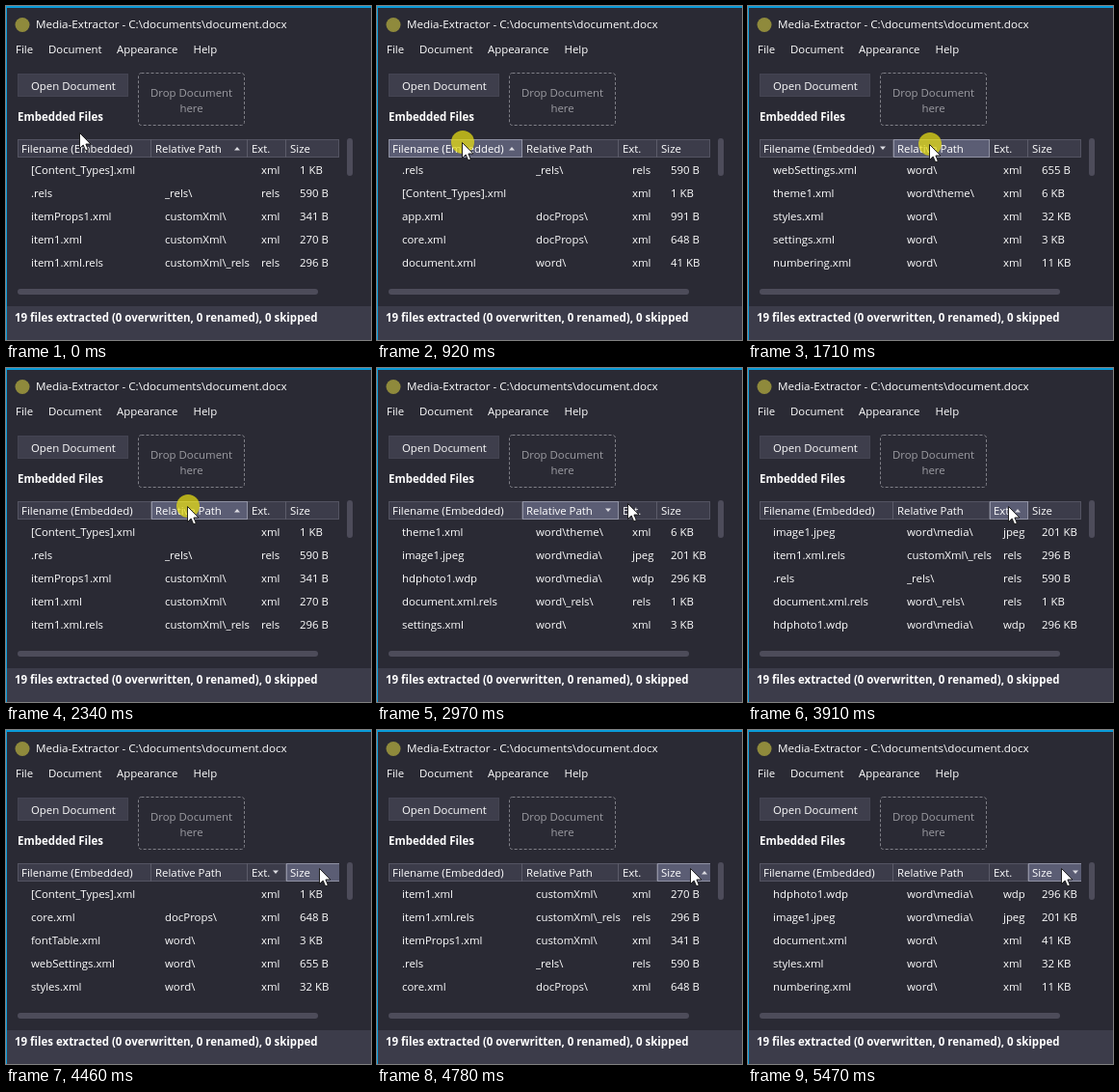
These frames come from a looping animation (379x346 px, 7.1 s). An HTML page with a canvas:

```html
<!DOCTYPE html>
<html lang="en">
<head>
<meta charset="utf-8">
<title>Media-Extractor</title>
<style>
  html, body { margin: 0; width: 100%; height: 100%; overflow: hidden; background: #2a2a34; }
  canvas { display: block; width: 379px; height: 346px; }
</style>
</head>
<body>
<canvas id="stage" width="379" height="346"></canvas>
<script>
const ctx = document.getElementById('stage').getContext('2d');
const LOOP = 7100;
const STEP = 78.2;        // the pointer is redrawn once per step
const SORT_DELAY = 160;   // from mouse press to the re-sorted list
const FONT = '"Open Sans", "Noto Sans", sans-serif';
const BACK = '#2a2a34', PANEL = '#3c3c4a', ACCENT = '#0a9bd8';

const columns = [
  { title: 'Filename (Embedded)', left: 12, right: 151 },
  { title: 'Relative Path', left: 151, right: 251 },
  { title: 'Ext.', left: 251, right: 291 },
  { title: 'Size', left: 291, right: 351 }
];
const table = { left: 12, right: 346, top: 138, height: 19 };

// name: [relative path, size]
const files = {
  '[Content_Types].xml': ['', '1 KB'],
  '.rels': ['_rels\\', '590 B'],
  'itemProps1.xml': ['customXml\\', '341 B'],
  'item1.xml': ['customXml\\', '270 B'],
  'item1.xml.rels': ['customXml\\_rels\\', '296 B'],
  'app.xml': ['docProps\\', '991 B'],
  'core.xml': ['docProps\\', '648 B'],
  'document.xml': ['word\\', '41 KB'],
  'webSettings.xml': ['word\\', '655 B'],
  'theme1.xml': ['word\\theme\\', '6 KB'],
  'styles.xml': ['word\\', '32 KB'],
  'settings.xml': ['word\\', '3 KB'],
  'numbering.xml': ['word\\', '11 KB'],
  'fontTable.xml': ['word\\', '3 KB'],
  'image1.jpeg': ['word\\media\\', '201 KB'],
  'hdphoto1.wdp': ['word\\media\\', '296 KB'],
  'document.xml.rels': ['word\\_rels\\', '1 KB']
};

const byPath = '[Content_Types].xml .rels itemProps1.xml item1.xml item1.xml.rels';
const initial = { column: 1, ascending: true, rows: byPath };

// Each column is clicked twice: ascending, then descending
const clicks = [
  { at: 460, hold: 80, rows: '.rels [Content_Types].xml app.xml core.xml document.xml' },
  { at: 920, hold: 160, rows: 'webSettings.xml theme1.xml styles.xml settings.xml numbering.xml' },
  { at: 1710, hold: 160, rows: byPath },
  { at: 2340, hold: 160, rows: 'theme1.xml image1.jpeg hdphoto1.wdp document.xml.rels settings.xml' },
  { at: 3510, hold: 80, rows: 'image1.jpeg item1.xml.rels .rels document.xml.rels hdphoto1.wdp' },
  { at: 3830, hold: 80, rows: '[Content_Types].xml core.xml fontTable.xml webSettings.xml styles.xml' },
  { at: 4620, hold: 80, rows: 'item1.xml item1.xml.rels itemProps1.xml .rels core.xml' },
  { at: 5310, hold: 80, rows: 'hdphoto1.wdp image1.jpeg document.xml styles.xml numbering.xml' }
].map((click, i) => ({ ...click, column: i >> 1, ascending: i % 2 === 0 }));

const moves = [
  { from: 0, to: 240, x: 89, y: 141 },
  { from: 1000, to: 1540, x: 189, y: 143 },
  { from: 2650, to: 3037, x: 271, y: 143 },
  { from: 3990, to: 4220, x: 326, y: 143 }
];

// The pointer eases from header to header along a slight arc
function pointerAt(t) {
  let x = 77, y = 131;
  for (const m of moves) {
    const p = Math.min(1, Math.max(0, (t - m.from) / (m.to - m.from)));
    const e = p * p * (3 - 2 * p);
    x += (m.x - x) * e;
    y += (m.y - y) * e - 4 * Math.sin(Math.PI * p);
  }
  return [Math.round(x), Math.round(y)];
}

// Header highlighting trails the pointer by one step
function hoveredColumn(t) {
  const [x, y] = pointerAt(t - STEP);
  return y < table.top ? -1 : columns.findIndex(c => x >= c.left && x < c.right);
}

function text(str, x, y, { size = 11.4, weight = 400, color = '#fff', align = 'left' } = {}) {
  ctx.font = `${weight} ${size}px ${FONT}`;
  ctx.fillStyle = color;
  ctx.textAlign = align;
  ctx.fillText(str, x, y);
}

function fill(x, y, w, h, color) {
  ctx.fillStyle = color;
  ctx.fillRect(x, y, w, h);
}

function box(x, y, w, h, color, border) {
  fill(x, y, w, h, color);
  ctx.strokeStyle = border;
  ctx.lineWidth = 1;
  ctx.strokeRect(x + 0.5, y + 0.5, w - 1, h - 1);
}

function rounded(x, y, w, h, r) {
  ctx.beginPath();
  ctx.roundRect(x, y, w, h, r);
}

function disc(x, y, r, color) {
  ctx.fillStyle = color;
  ctx.beginPath();
  ctx.arc(x, y, r, 0, Math.PI * 2);
  ctx.fill();
}

function clipped(x, y, w, h, paint) {
  ctx.save();
  ctx.beginPath();
  ctx.rect(x, y, w, h);
  ctx.clip();
  paint();
  ctx.restore();
}

function drawWindow() {
  fill(0, 0, 379, 346, BACK);
  fill(0, 311, 379, 35, PANEL);
  fill(0, 0, 379, 2, ACCENT);
  fill(0, 0, 1, 346, ACCENT);

  disc(17, 19.5, 7.5, '#8f8a3c');
  text('Media-Extractor - C:\\documents\\document.docx', 31, 23, { size: 11.65 });
  text('File', 10, 49);
  text('Document', 44, 49);
  text('Appearance', 115, 49);
  text('Help', 194.5, 49);

  box(12, 70, 115, 24, '#3e3e4c', '#444452');
  text('Open Document', 26, 87);

  ctx.strokeStyle = '#808088';
  ctx.lineWidth = 1;
  ctx.setLineDash([3, 2]);
  rounded(137.5, 69.5, 110, 54, 3);
  ctx.stroke();
  ctx.setLineDash([]);
  const hint = { color: '#9c9ca2', align: 'center' };
  text('Drop Document', 192.5, 94, hint);
  text('here', 192.5, 110, hint);

  const bold = { size: 11.47, weight: 700 };
  text('Embedded Files', 12, 119, bold);
  text('19 files extracted (0 overwritten, 0 renamed), 0 skipped', 9, 327, bold);

  ctx.fillStyle = '#4d4c5a';
  rounded(354, 137, 6, 39, 3);
  ctx.fill();
  rounded(12, 293, 312, 6, 3);
  ctx.fill();
}

function drawArrow(x, up) {
  const base = up ? 149.5 : 145.5, tip = up ? 146 : 149;
  ctx.fillStyle = '#dcdce2';
  ctx.beginPath();
  ctx.moveTo(x - 3, base);
  ctx.lineTo(x + 3, base);
  ctx.lineTo(x, tip);
  ctx.fill();
}

function drawHeader({ column, ascending }, hovered) {
  const { left, right, top, height } = table;
  box(left, top, right - left, height, PANEL, '#545462');
  clipped(left, top, right - left, height, () => columns.forEach((c, i) => {
    if (i === hovered) box(c.left, top, c.right - c.left, height, '#5b5d74', '#9092a4');
    else fill(c.right - 1, top, 1, height, '#5c5c6a');
    text(c.title, c.left + 4, 152);
    if (i === column) drawArrow(c.right - 11, ascending);
  }));
}

function drawRows(names) {
  names.split(' ').forEach((name, row) => {
    const [folder, size] = files[name];
    const cells = [name, folder, name.split('.').pop(), size];
    columns.forEach((c, i) => {
      clipped(c.left, 158, c.right + 2 - c.left, 125,
        () => text(cells[i], c.left + 14, 174 + row * 24));
    });
  });
}

function drawPointer(x, y) {
  const shape = [[0, 0], [0, 16], [3.7, 12.5], [6.2, 18.3], [8.8, 17.2], [6.4, 11.5], [11.4, 11.5]];
  ctx.beginPath();
  shape.forEach(([dx, dy]) => ctx.lineTo(x - 0.5 + dx, y + 0.5 + dy));
  ctx.closePath();
  ctx.fillStyle = '#fff';
  ctx.fill();
  ctx.strokeStyle = '#111';
  ctx.lineWidth = 0.9;
  ctx.stroke();
}

function draw(t) {
  const stepped = Math.max(0, Math.floor((t + 20) / STEP) * STEP - 20);
  const view = clicks.filter(c => t >= c.at + SORT_DELAY).pop() || initial;
  const pressed = clicks.some(c => t >= c.at && t < c.at + c.hold);
  const [x, y] = pointerAt(stepped);
  drawWindow();
  drawHeader(view, hoveredColumn(stepped));
  drawRows(view.rows);
  if (pressed) disc(x, y, 12, 'rgba(230, 220, 20, 0.74)');
  drawPointer(x, y);
}

const start = performance.now();
function loop() {
  draw((performance.now() - start) % LOOP);
  requestAnimationFrame(loop);
}
loop();
</script>
</body>
</html>
```
